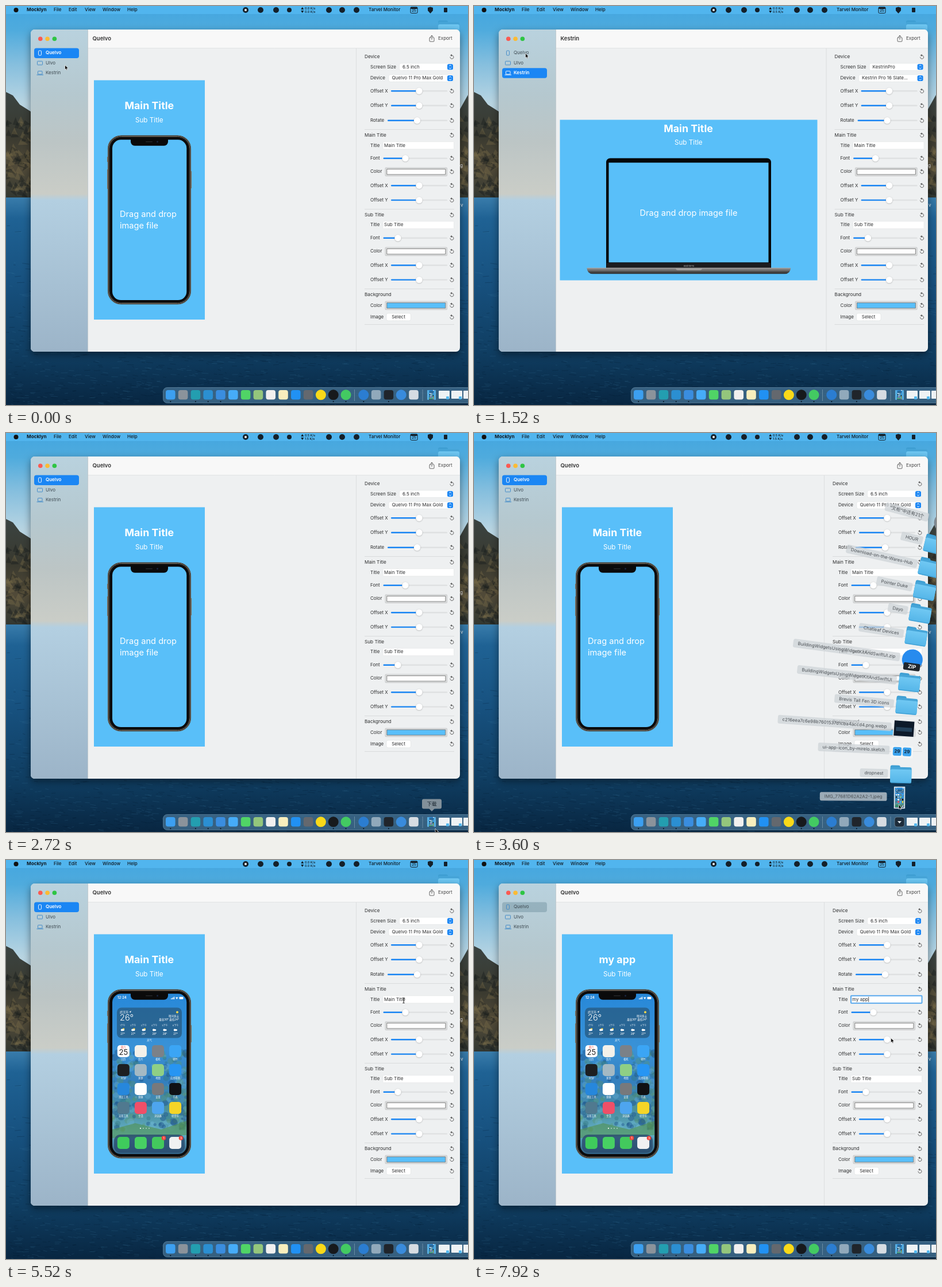
Recreate the animation shown at these times as an HTML page with a canvas. Size 804 by 696 pixels, loop 8 s.

```html
<!DOCTYPE html>
<html lang="en">
<head>
<meta charset="utf-8">
<title>Mockup editor</title>
<style>
html, body { margin: 0; width: 100%; height: 100%; overflow: hidden; }
canvas { display: block; }
</style>
</head>
<body>
<canvas id="stage" width="804" height="696"></canvas>
<script>
const stage = document.getElementById('stage').getContext('2d');
let c = stage;
const BLUE = '#59bff9', ACCENT = '#1a86f4', INK = '#2c2d2e';
const FONT = 'Inter, "Noto Sans CJK SC", "Noto Sans CJK", sans-serif';

function box(x, y, w, h, r, fill, stroke, lw = 1) {
  c.beginPath();
  c.roundRect(x, y, w, h, r);
  if (fill) { c.fillStyle = fill; c.fill(); }
  if (stroke) { c.strokeStyle = stroke; c.lineWidth = lw; c.stroke(); }
}
function disc(x, y, r, fill) {
  c.beginPath();
  c.arc(x, y, r, 0, 7);
  c.fillStyle = fill;
  c.fill();
}
function poly(points, fill, stroke, lw = 1) {
  c.beginPath();
  for (let i = 0; i < points.length; i += 2) c.lineTo(points[i], points[i + 1]);
  c.closePath();
  if (fill) { c.fillStyle = fill; c.fill(); }
  if (stroke) { c.strokeStyle = stroke; c.lineWidth = lw; c.stroke(); }
}
function line(x1, y1, x2, y2, color, lw = 1) {
  c.beginPath();
  c.moveTo(x1, y1);
  c.lineTo(x2, y2);
  c.strokeStyle = color;
  c.lineWidth = lw;
  c.stroke();
}
function text(s, x, y, size = 8, color = INK, weight = 400, align = 'left') {
  c.font = `${weight} ${size}px ${FONT}`;
  c.textAlign = align;
  c.textBaseline = 'middle';
  c.fillStyle = color;
  c.fillText(s, x, y);
}
// stops: offset, color, offset, color...
function fade(y1, y2, ...stops) {
  const g = c.createLinearGradient(0, y1, 0, y2);
  for (let i = 0; i < stops.length; i += 2) g.addColorStop(stops[i], stops[i + 1]);
  return g;
}
function random(seed) {
  return () => (seed = seed * 16807 % 2147483647) / 2147483647;
}
// Draws once on its own layer
function layer(draw) {
  const el = document.createElement('canvas');
  el.width = 804;
  el.height = 696;
  const old = c;
  c = el.getContext('2d');
  draw();
  c = old;
  return el;
}
const ease = p => (p = Math.max(0, Math.min(1, p)), p * p * (3 - 2 * p));

/* ---------- desktop ---------- */

function folder(x, y) {
  c.save();
  c.translate(x, y);
  box(-18, -16, 17, 10, 3, '#3f9fd3');
  box(-18, -13, 37, 27, 3, '#46a5d8');
  box(-18, -9, 37, 24, 3, fade(-9, 15, 0, '#70c8f3', 1, '#54b5e8'));
  line(-17, 14, 18, 14, '#3d9bcf');
  c.restore();
}

function wallpaper() {
  const rnd = random(77);
  box(0, 0, 804, 340, 0, fade(0, 170, 0, '#43a6e0', .25, '#4fabdd', .6, '#86bfde', 1, '#b9d5e2'));
  poly([0, 150, 12, 156, 24, 172, 43, 184, 400, 215, 780, 188, 790, 180, 804, 155, 804, 340, 0, 340],
    fade(150, 340, 0, '#3b4442', .4, '#39392f', .7, '#514a38', 1, '#2f3530'));
  for (let i = 0; i < 90; i++) {
    const x = i % 3 ? rnd() * 45 : 788 + rnd() * 16, y = 190 + rnd() * 130;
    poly([x, y, x + 4 + rnd() * 9, y + 6 + rnd() * 12, x - 5, y + 8 + rnd() * 6],
      i % 2 ? 'rgba(125,111,74,.35)' : 'rgba(22,28,28,.4)');
  }
  box(0, 334, 804, 362, 0, fade(334, 696, 0, '#397cab', .1, '#1f6294', .4, '#17517f', .75, '#0f3d61', 1, '#082641'));
  for (let i = 0; i < 1500; i++) {
    const y = 340 + 356 * Math.sqrt(rnd()), x = rnd() * 804, w = 3 + rnd() * 10;
    line(x, y, x + w, y + rnd() * 3 - 1, i % 2 ? 'rgba(70,133,174,.18)' : 'rgba(3,22,42,.25)', 1);
  }
  folder(770, 41);
  text('g', 790, 279, 8, '#fff');
  text('v', 791, 348, 8, '#fff');
}

function menuBar() {
  box(0, 0, 804, 14, 0, '#51b5ee');
  disc(17.5, 7, 4, '#111');
  text('Mocklyn', 36, 7, 8.2, '#101820', 700);
  [['File', 83], ['Edit', 109], ['View', 137], ['Window', 168], ['Help', 211], ['Tarvel Monitor', 631]]
    .forEach(([s, x]) => text(s, x, 7, 8, '#101820', 500));
  for (const x of [417, 443, 470, 493, 562, 585, 610]) disc(x, 7, x == 493 ? 4 : 5, '#14202a');
  box(415.3, 5.3, 3.4, 3.4, .5, '#fff');
  box(704, 2, 12, 10.5, 1.5, null, '#14202a');
  box(704, 2, 12, 3, 1, '#14202a');
  text('25', 710, 8.7, 6, '#14202a', 600, 'center');
  poly([734, 3, 738.5, 1.5, 743, 3, 743, 8, 738.5, 13, 734, 8], '#14202a');
  box(762, 3, 6, 8, 1, '#14202a');
}

const DOCK = '#3c9ff0 #8b939b #239eb0 #2b8fd2 #3a8ddf #46acf8 #50d466 #94c67c #f1f0ef #f8eebd #2191f3 #64686e @#f9d919 @#17191c @#43ca62 @#2b7dd1 #91a9bb #20252b @#398bdc #d6dce2'.split(' ');
function dock() {
  box(273.5, 665.5, 560, 27, 7, 'rgba(73,119,151,.72)', 'rgba(140,175,198,.45)');
  DOCK.forEach((color, i) => {
    const x = 286.3 + i * 21.8 + (i > 14 ? 9 : 0);
    if (color[0] == '@') disc(x, 678.3, 9, color.slice(1));
    else box(x - 8.3, 670, 16.6, 16.6, 4, color);
    if ([0, 2, 3, 4, 13, 14, 15, 17].includes(i)) disc(x, 690, 1, '#08131d');
  });
  line(606.5, 669, 606.5, 689, 'rgba(200,220,230,.35)');
  line(725, 669, 725, 689, 'rgba(200,220,230,.35)');
  for (const x of [753, 775, 796]) {
    box(x, 671, 19, 14, 1, '#eef2f4');
    box(x + 13, 681, 5, 5, 1, '#55b9ef');
  }
}

/* ---------- window ---------- */

function windowBase() {
  c.save();
  c.shadowColor = 'rgba(0,0,0,.45)';
  c.shadowBlur = 14;
  c.shadowOffsetY = 5;
  box(43, 41, 747, 562, 7, '#eef0f1');
  c.restore();
  c.save();
  c.beginPath();
  c.roundRect(43, 41, 747, 562, 7);
  c.clip();
  box(43, 41, 99, 562, 0, fade(41, 603, 0, '#b9d2de', .2, '#b5c8cf', .35, '#bcc5c5', .51, '#cacdc7', .53, '#b3cfe1', .8, '#a6c0d3', 1, '#9cb4c8'));
  box(142, 41, 648, 32, 0, '#f8f8f8');
  line(142.5, 41, 142.5, 603, '#c2cbd0');
  line(143, 73.5, 790, 73.5, '#e1e3e4');
  c.restore();
  ['#fb5a52', '#fcbb34', '#2ec544'].forEach((f, i) => disc(59.8 + i * 12.3, 57.3, 3.8, f));
  c.lineCap = 'round';
  box(737, 55, 8, 7, 1, null, '#555', .9);
  line(741, 51.5, 741, 58.5, '#f8f8f8', 2.5);
  line(741, 51.5, 741, 58.5, '#555', .9);
  line(738.8, 53.7, 741, 51.5, '#555', .9);
  line(743.2, 53.7, 741, 51.5, '#555', .9);
  c.lineCap = 'butt';
  text('Export', 752, 57, 8, '#444');
}

const NAMES = ['Quelvo', 'Ulvo', 'Kestrin'];
function sidebar(active, focused) {
  box(49, 73.5 + active * 17.4, 78, 17.4, 4, focused ? 'rgba(70,110,125,.3)' : ACCENT);
  NAMES.forEach((name, i) => {
    const y = 82 + i * 17.3, on = i == active && !focused, col = on ? '#fff' : '#3a86c8';
    if (i == 0) box(56.5, y - 4, 5, 8, 1.2, null, col, .9);
    if (i == 1) box(54.5, y - 3, 9, 6.5, 1, null, col, .9);
    if (i == 2) {
      box(55.5, y - 3, 7.5, 5.5, .7, null, col, .9);
      line(53.5, y + 3.5, 65, y + 3.5, col);
    }
    text(name, 69, y, 8, on ? '#fff' : '#3e4a52', on ? 600 : 400);
  });
  text(NAMES[active], 150.5, 57.2, 9.5, '#303030', 600);
}

function reset(y) {
  c.beginPath();
  c.arc(776, y + .5, 3, -1.9, 3.3);
  c.strokeStyle = '#555';
  c.lineWidth = .9;
  c.stroke();
  poly([773, y - 2.6, 776, y - 4.6, 776, y - .8], '#555');
}
function slider(label, y, x, knob) {
  text(label, 634, y, 8);
  box(x, y - 1.2, 768 - x, 2.4, 1.2, '#dfe1e2');
  box(x, y - 1.2, knob - x, 2.4, 1.2, ACCENT);
  c.save();
  c.shadowColor = 'rgba(0,0,0,.3)';
  c.shadowBlur = 2;
  c.shadowOffsetY = .5;
  disc(knob, y, 5.7, '#fff');
  c.restore();
  reset(y);
}
function popup(label, y, x, value) {
  text(label, 634, y, 8);
  box(x, y - 6.3, 779 - x, 12.6, 3, '#fff', '#e3e5e6', .7);
  box(768, y - 5, 10, 10, 2.5, ACCENT);
  for (const d of [-1, 1]) {
    c.beginPath();
    c.moveTo(771, y + d * 1.2);
    c.lineTo(773, y + d * 3.2);
    c.lineTo(775, y + d * 1.2);
    c.strokeStyle = '#fff';
    c.lineWidth = 1;
    c.stroke();
  }
  text(value, x + 5.5, y, 8);
}
function swatch(y, fill) {
  text('Color', 634, y, 8);
  box(660, y - 7, 107.5, 14.5, 1, '#dddfdf', '#bfc1c2', .8);
  box(662.8, y - 4.5, 102, 9.4, 0, fill, '#777', .9);
  reset(y);
}
function heading(s, y) {
  text(s, 624, y, 8.2);
  reset(y);
}
function field(y, value, focus, selected) {
  text('Title', 634, y, 8);
  box(656, y - 6.5, 123.5, 13, 1, '#fff', focus ? '#59a9ed' : '#e4e6e7', focus ? 2 : .7);
  c.font = '400 8px ' + FONT;
  const w = c.measureText(value).width;
  if (selected) box(657.5, y - 5, w + 1, 10, 0, '#b3d7ff');
  text(value, 658, y, 8);
  if (focus && !selected) line(658.8 + w, y - 4.5, 658.8 + w, y + 4.5, '#222', .8);
}
function panel(wide, s) {
  c.save();
  c.translate(wide ? 3.6 : 0, 0);
  line(609.5, 74, 609.5, 603, '#dcdedf');
  for (const y of [215.5, 354.5, 493.5, 555.5]) line(624, y, 780, y, '#d9dbdc');
  heading('Device', 88.7);
  popup('Screen Size', 106.3, 684.5, wide ? 'KestrinPro' : '6.5 inch');
  popup('Device', 126, 666, wide ? 'Kestrin Pro 16 Slate...' : 'Quelvo 11 Pro Max Gold');
  slider('Offset X', 148.3, 670, 719);
  slider('Offset Y', 173.8, 670, 719);
  slider('Rotate', 199.7, 664, 715.5);
  heading('Main Title', 225.3);
  field(243.2, s.title, s.focus, s.selected);
  slider('Font', 265.7, 656.5, 695);
  heading('Sub Title', 364.5);
  field(382, 'Sub Title');
  slider('Font', 404.7, 656.5, 682);
  for (const y of [289, 428]) {
    swatch(y, '#fff');
    slider('Offset X', y + 24.2, 670, 719);
    slider('Offset Y', y + 49.6, 670, 719);
  }
  heading('Background', 503.5);
  swatch(522.2, BLUE);
  text('Image', 634, 542.7, 8);
  box(662, 536, 42.5, 13, 3, '#fff', '#e0e2e3', .7);
  text('Select', 683, 542.3, 8, INK, 400, 'center');
  reset(542.7);
  c.restore();
}

/* ---------- mockups ---------- */

function notebook(title) {
  box(149.5, 198.5, 448, 280, 0, BLUE);
  text(title, 373, 214.2, 17.8, '#fff', 700, 'center');
  text('Sub Title', 373.3, 238, 11.7, '#fff', 400, 'center');
  box(230, 265.5, 287, 194, [7, 7, 0, 0], '#050506');
  box(234.5, 273.3, 278, 174, 0, BLUE);
  box(231, 448, 285, 9, 0, '#1c1c1e');
  text('KestrinPro', 374, 453.8, 3.8, '#b0b0b0', 400, 'center');
  box(196.5, 456.7, 354.5, 10.5, [1, 1, 11, 11], fade(456, 467, 0, '#92908f', .45, '#757473', .6, '#575655', 1, '#2b2a2a'));
  line(197, 457.2, 550.5, 457.2, '#b9b7b5', .8);
  box(351, 457, 46, 4, [0, 0, 4, 4], '#a19f9d');
  text('Drag and drop image file', 373.5, 361.5, 14.6, '#fff', 400, 'center');
}

const APPS = [
  ['#fff', '#f4f1ea', '#7b8188', '#3ba5f5'], ['#1d1f22', '#a4b9c4', '#8fcf85', '#2795f3'],
  ['#2687dc', '#fff', '#77797c', '#101114'], ['#50798f', '#ef4f68', '#4ea5ef', '#f5d527'],
  ['#3fcb5c', '#47d063', '#43c95d', '#f0f1f2']];
const LABELS = [['日历', '照片', '相机', '邮件'], ['时钟', '家庭', '地图', '应用市场'],
  ['测试工具', '健康', '设置', '手表'], ['实用工具', '生活', '浏览器', '听音乐']];

function homeScreen() {
  const rnd = random(31);
  box(184, 232, 131, 283, 0, fade(232, 514, 0, '#2788d9', .35, '#3a92d6', .55, '#347fbd', .75, '#4c93a6', .87, '#64b1c9', 1, '#2f5d80'));
  for (let i = 0; i < 260; i++) {
    const y = 335 + rnd() * 135, edge = rnd() < .6 ? rnd() ** 2 * 45 : rnd() * 130;
    disc(rnd() < .5 ? 185 + edge : 314 - edge, y, 1.5 + rnd() * 5,
      ['rgba(28,82,138,.45)', 'rgba(51,117,128,.4)', 'rgba(93,153,105,.35)', 'rgba(113,184,219,.3)'][i % 4]);
  }
  poly([185, 470, 225, 459, 270, 470, 314, 455, 314, 480, 185, 485], 'rgba(83,145,79,.6)');
  text('12:24', 194, 240.5, 6, '#fff', 600);
  for (let i = 0; i < 4; i++) box(287 + i * 1.7, 241.5 - i, 1.1, 1.5 + i, 0, '#fff');
  poly([295, 239.5, 299.5, 239.5, 297.2, 243], '#fff');
  box(301.5, 238.7, 7, 4, 1, '#fff');
  box(193, 257.5, 113, 53, 8, 'rgba(39,92,131,.78)');
  text('武汉市', 198, 265, 5, '#fff', 500);
  poly([214, 265.3, 218, 263, 216.5, 267, 216, 265.3], '#fff');
  text('26°', 198, 275.8, 14.5, '#fff', 300);
  disc(298, 265.5, 2, '#f8d64c');
  text('晴间多云', 301, 273, 4.5, '#fff', 500, 'right');
  text('最高30° 最低24°', 301, 279, 4.5, '#fff', 500, 'right');
  for (let i = 0; i < 6; i++) {
    const x = 203 + i * 18.4;
    text(i + 1 + '下午', x, 288.5, 4, '#dbe8f2', 400, 'center');
    if (i < 3) disc(x + 1.5, 295, 1.8, '#f8d64c');
    disc(x - 1.2, 296.4, 2, '#fff');
    disc(x + 1.3, 296.6, 1.7, '#fff');
    text((i < 2 ? 27 : 28) - (i > 4) + '°', x, 303.8, 4.5, '#fff', 500, 'center');
  }
  text('天气', 249.5, 315, 4.5, '#fff', 400, 'center');
  box(188, 479, 123, 31.5, 11, 'rgba(42,75,110,.8)');
  APPS.forEach((row, j) => row.forEach((fill, i) => {
    const x = 204.3 + i * 30.1, y = j == 4 ? 493.5 : 333.5 + j * 33;
    box(x - 10.5, y - 10.5, 21, 21, 5, fill);
    if (j < 4) text(LABELS[j][i], x, y + 14.2, 4.2, '#fff', 400, 'center');
  }));
  text('周六', 204.3, 327, 4.5, '#e84b45', 500, 'center');
  text('25', 204.3, 336, 13, '#222', 400, 'center');
  for (const x of [274.5, 304.5]) {
    disc(x, 485, 3.8, '#f0443c');
    text(x < 280 ? '1' : '3', x, 485.2, 5, '#fff', 500, 'center');
  }
  for (let i = 0; i < 4; i++) disc(234 + i * 5, 468, 1.1, i ? 'rgba(255,255,255,.5)' : '#fff');
}
const homeLayer = layer(homeScreen);

function phone(title, loaded) {
  box(153, 129.5, 193, 417.5, 0, BLUE);
  text(title, 249.3, 175, 17.8, '#fff', 700, 'center');
  text('Sub Title', 249.3, 199, 11.7, '#fff', 400, 'center');
  for (const [y, h] of [[263, 9], [285, 20], [299, 20]]) box(176, y, 2, h, .5, '#80725e');
  box(321, 288, 2, 30, .5, '#80725e');
  box(177.5, 226, 144, 294, 23, '#0a0a0b', '#625a4f', 1.2);
  box(179, 227.5, 141, 291, 21.5, null, '#a0978a', .8);
  box(180.2, 228.7, 138.6, 288.6, 20.5, null, '#27241f', 1);
  c.save();
  c.beginPath();
  c.roundRect(185, 233.3, 129.3, 279.8, 15);
  c.clip();
  if (loaded) c.drawImage(homeLayer, 0, 0);
  else box(184, 232, 132, 284, 0, BLUE);
  c.restore();
  box(217, 232, 65, 11.7, [0, 0, 7, 7], '#0a0a0b');
  box(243, 236, 12, 1.5, .7, '#252629');
  disc(263.5, 236.8, 1.5, '#1b2640');
  if (!loaded) {
    text('Drag and drop', 198, 364, 14.6, '#fff');
    text('image file', 198, 384, 14.6, '#fff');
  }
}

/* ---------- file stack ---------- */

function thumb(x, y) {
  box(x - 9.5, y - 19, 19, 38, 0, '#f4f6f7', '#a8b2b8', .5);
  c.drawImage(homeLayer, 185, 233, 129, 280, x - 8, y - 17.5, 16, 35);
}
const FILES = ['IMG_77681D62A2A2-1.jpeg', 'dropnest', 'ui-app-icon_by-mirelo.sketch',
  'c216eea7c6e98b7601537d1cba4accd4.png.webp', 'Brevis Tall Fen 3D icons',
  'BuildingWidgetsUsingWidgetKitAndSwiftUI', 'BuildingWidgetsUsingWidgetKitAndSwiftUI.zip',
  'Chatleaf Devices', 'Dayo', 'Pointer Duke', 'Download-on-the-Wares-Hub', 'HOUR', '“文柜”中还有21个'];
function fileIcon(k) {
  if (k == 0) thumb(0, 0);
  else if (k == 2) {
    box(-19, -10, 38, 21, 1, '#f2f5f6');
    for (const x of [-8.5, 8.5]) {
      box(x - 7.5, -7.5, 15, 15, 3, '#3ba3ee');
      text('29', x, 0, 8, '#12263a', 700, 'center');
    }
  } else if (k == 3) {
    box(-18, -14, 36, 28, 0, '#0d1a2a', '#e7eaec', 1.5);
    box(-14, -2, 28, 7, 1, '#234059');
  } else if (k == 6) {
    disc(0, 0, 18, '#278bee');
    box(-14, 6, 29, 13, 3, '#20262d');
    text('ZIP', 1, 12.6, 9, '#fff', 700, 'center');
  } else if (k == 12) disc(6, 0, 17, '#7c8790');
  else folder(0, 0);
}
function stack(open, dragging) {
  FILES.forEach((name, k) => {
    if (dragging && !k) return;
    const x = 740.5 + (1.5 * k + .37 * k * k) * open, y = 678 - (42 + 40.1 * k) * open;
    c.save();
    c.globalAlpha = open;
    c.translate(x, y);
    c.rotate((.3 + 1.22 * k) * Math.PI / 180 * open);
    c.save();
    c.scale(.45 + .55 * open, .45 + .55 * open);
    fileIcon(k);
    c.restore();
    c.font = '400 7.8px ' + FONT;
    const w = c.measureText(name).width;
    box(-38 - w, -9, w + 16, 15, 3, 'rgba(207,212,216,.74)');
    text(name, -30, -1.3, 7.8, '#4a4f54', 400, 'right');
    c.restore();
  });
}
function downloads(opened) {
  if (opened) {
    box(732, 670, 17, 17, 4, '#1d2c3a', '#7890a2', .7);
    poly([737, 677, 744, 677, 740.5, 681], '#dfe8ee');
  } else {
    box(733, 670, 15, 17, 1, '#57aee0');
    c.drawImage(homeLayer, 185, 233, 129, 280, 736, 670, 9, 17);
  }
}
function tooltip() {
  box(724, 638.5, 34, 17, 3, '#82909a');
  poly([736, 655, 746, 655, 741, 660], '#82909a');
  text('下载', 741, 647, 8.5, '#16222c', 500, 'center');
}

/* ---------- pointer ---------- */

// ms, x, y
const PATH = [
  [0, 102.5, 103], [320, 96, 108], [640, 90, 116], [1200, 89, 114], [1480, 89.5, 82.5],
  [1800, 89.5, 82.5], [2560, 747, 690], [2720, 747, 690], [2960, 741, 680], [3120, 741, 680],
  [3480, 739, 648], [3640, 739, 648], [4160, 308.5, 376], [4400, 256, 372], [4640, 256, 372],
  [5360, 692, 245], [7440, 692, 245], [7840, 725.5, 310.5], [8000, 725.5, 310.5]];
function pointerAt(t) {
  const i = PATH.findIndex(p => p[0] > t), [t0, x0, y0] = PATH[i - 1], [t1, x1, y1] = PATH[i];
  const p = ease((t - t0) / (t1 - t0));
  return [x0 + (x1 - x0) * p, y0 + (y1 - y0) * p];
}
function pointer(x, y, beam) {
  if (beam) {
    line(x, y - 4.5, x, y + 4.5, '#222', 1);
    for (const d of [-4.5, 4.5]) line(x - 1.8, y + d, x + 1.8, y + d, '#222', .8);
    return;
  }
  c.save();
  c.translate(x, y);
  poly([0, 0, 0, 8.2, 1.9, 6.5, 3.1, 9.2, 4.5, 8.6, 3.3, 6, 5.8, 5.8], '#0b0b0b', '#fff', .7);
  c.restore();
}

/* ---------- playback ---------- */

const baseLayer = layer(() => { wallpaper(); menuBar(); windowBase(); dock(); });
// ms, upper speed, lower speed
const SPEED = [[0, '0.0', '0.0'], [1200, '0.0', '0.5'], [2320, '0.5', '1.5'], [5040, '0.0', '0.0'], [7200, '0.5', '0.0']];
const TYPED = 'my app';

function draw(t) {
  const wide = t >= 720 && t < 1600, loaded = t >= 4560, focus = t >= 5760;
  const dragging = t >= 3680 && t < 4560;
  const title = t < 6320 ? 'Main Title' : TYPED.slice(0, 1 + Math.floor((t - 6320) / 160));
  const state = { title, focus, selected: t >= 5840 && t < 6320 };
  c.drawImage(baseLayer, 0, 0);
  const [, up, down] = SPEED.findLast(s => s[0] <= t);
  text('▲ ' + up + ' K/s', 513, 4, 5.4, '#101820', 500);
  text('▼ ' + down + ' K/s', 513, 10, 5.4, '#101820', 500);
  sidebar(wide ? 2 : 0, focus);
  if (wide) notebook(title);
  else phone(title, loaded);
  panel(wide, state);

  const open = ease((t - 3040) / 320) * (1 - ease((t - 3760) / 320));
  downloads(open > 0);
  if (t >= 2560 && t < 3040) tooltip();
  if (open > 0) stack(open, dragging);

  const [x, y] = pointerAt(t);
  if (dragging) {
    thumb(x + 4, y + 5);
    disc(x + 6.5, y + 12, 5, '#2fc14a');
    line(x + 3.8, y + 12, x + 9.2, y + 12, '#fff', 1.3);
    line(x + 6.5, y + 9.3, x + 6.5, y + 14.7, '#fff', 1.3);
  }
  if (t < 6320 || t > 7360) pointer(x, y, x > 655 && y > 236 && y < 250);
}

function frame(now) {
  draw(Math.floor(now % 8000 / 80) * 80);
  requestAnimationFrame(frame);
}
requestAnimationFrame(frame);
</script>
</body>
</html>
```
